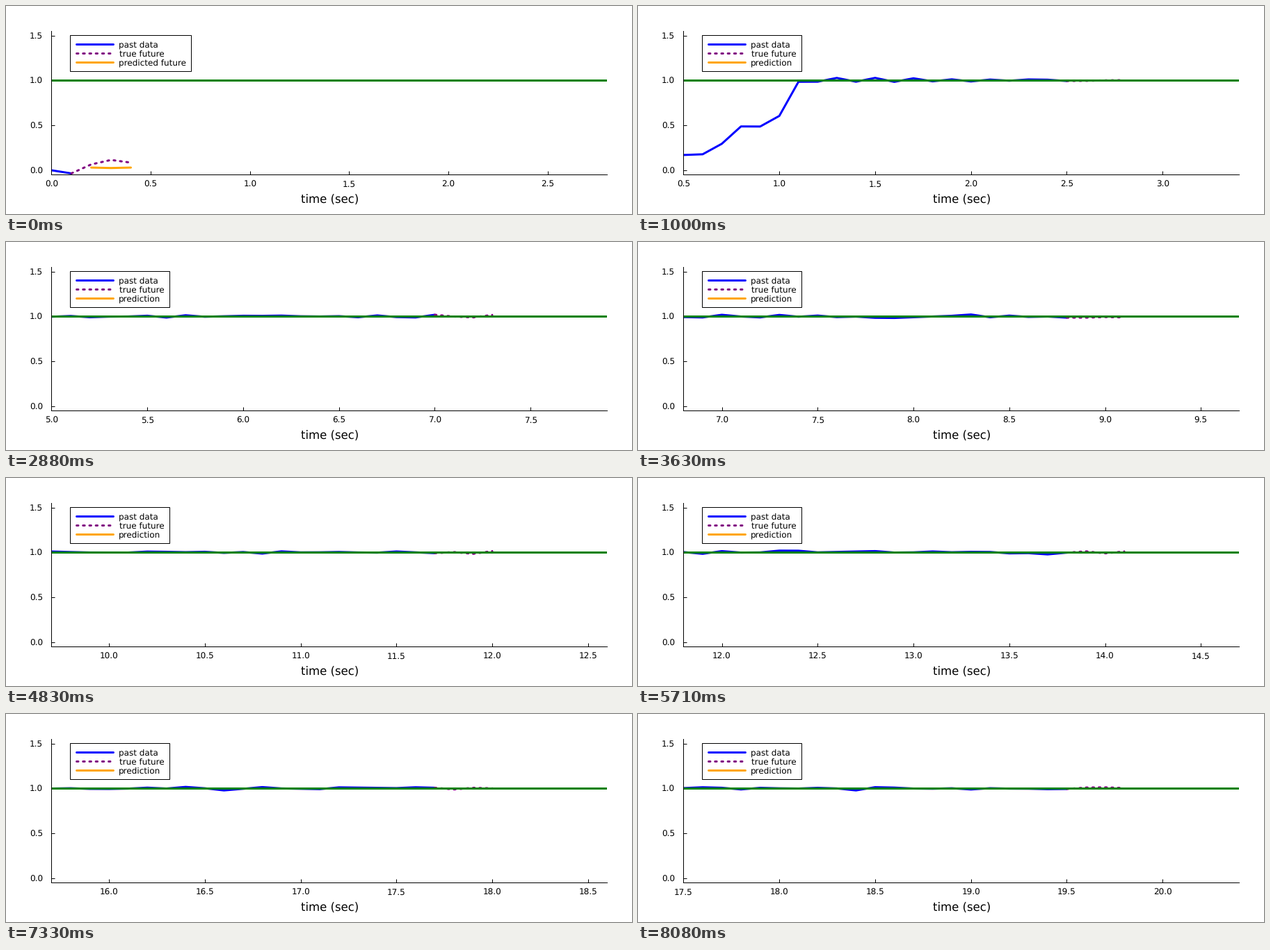
Recreate the animation shown at these times as a matplotlib script. Size 900 px wide and 300 px high, loop 8.12 s.

```python
import numpy as np
import matplotlib.pyplot as plt
from matplotlib.animation import FuncAnimation
from matplotlib.patches import Rectangle
from matplotlib.ticker import FormatStrFormatter, MultipleLocator

W, H, DPI = 900, 300, 100
PX = 72 / DPI                 # points per pixel
FRAMES, LOOP = 195, 8120
DT, HORIZON, START = 0.1, 3, 9  # control takes over at step START
LEFT, RIGHT, TOP, BOTTOM = 65.4, 864.4, 36.1, 243.4

plt.rcParams.update({
    "font.family": "DejaVu Sans",
    "text.hinting": "none",
    "lines.solid_capstyle": "round",
    "lines.dash_capstyle": "round",
    "lines.solid_joinstyle": "round",
    "lines.dash_joinstyle": "round",
})


def make_signal(n):
    """Exploration, then a damped ringing around 1 that fades into noise."""
    rng = np.random.default_rng(4)
    rise = [0, -0.035, 0.065, 0.115, 0.085, 0.17,
            0.178, 0.295, 0.488, 0.487, 0.605, 0.985]
    i = np.arange(n) - len(rise)
    ring = (0.008 - 0.022 * (-1.0) ** i) * np.exp(-np.maximum(i, 0) / 12)
    noise = rng.normal(0, 0.009, n).clip(-0.022, 0.025)
    y = 1 + ring + noise * np.clip(i / 12, 0, 1)
    y[:len(rise)] = rise
    return y


y = make_signal(FRAMES + 1 + HORIZON)
t = np.arange(len(y)) * DT
FIRST_GUESS = np.array([0.03, 0.025, 0.03])

PAST = dict(color="blue", lw=3 * PX)
FUTURE = dict(color="purple", lw=3 * PX, ls=(0, (2.5 / 3, 6.7 / 3)))
GUESS = dict(color="orange", lw=3 * PX)

fig = plt.figure(figsize=(W / DPI, H / DPI), dpi=DPI, facecolor="white")
ax = fig.add_axes([LEFT / W, 1 - BOTTOM / H,
                   (RIGHT - LEFT) / W, (BOTTOM - TOP) / H])
ax.set_ylim(-0.05, 1.55)
for side in ("top", "right"):
    ax.spines[side].set_visible(False)
for side in ("left", "bottom"):
    ax.spines[side].set_linewidth(PX)
ax.tick_params(direction="in", length=5 * PX, width=PX, labelsize=12 * PX)
ax.tick_params(axis="x", pad=8.7 * PX)
ax.tick_params(axis="y", pad=12.2 * PX)
for axis in (ax.xaxis, ax.yaxis):
    axis.set_major_locator(MultipleLocator(0.5))
    axis.set_major_formatter(FormatStrFormatter("%.1f"))
fig.text(465.4 / W, 1 - 284.6 / H, "time (sec)", size=16.5 * PX,
         ha="center", va="baseline")

past, = ax.plot([], [], **PAST)
future, = ax.plot([], [], **FUTURE)
guess, = ax.plot([], [], **GUESS)
ax.axhline(1, color="green", lw=3 * PX)

# legend, laid out in pixels
key = fig.add_axes([0, 0, 1, 1])
key.set(xlim=(0, W), ylim=(H, 0))
key.axis("off")
box = key.add_patch(Rectangle((92, 42), 174, 52, fc="white", ec="black",
                              lw=PX))


def key_row(row, x, text, style):
    mid = 55 + 12.8 * row
    key.plot([101, 154], [mid, mid], **style)
    return key.text(x, mid + 4.7, text, size=12 * PX, va="baseline")


key_row(0, 162, "past data", PAST)
key_row(1, 163, "true future", FUTURE)
guess_label = key_row(2, 162, "predicted future", GUESS)


def draw(k):
    now = k + 1
    ahead = slice(now + 1, now + HORIZON + 1)
    exploring = k < START

    past.set_data(t[:now + 1], y[:now + 1])
    future.set_data(t[now:now + HORIZON + 1], y[now:now + HORIZON + 1])
    if exploring:
        level = FIRST_GUESS + k / START * (y[ahead] - FIRST_GUESS)
    else:
        level = np.ones(HORIZON)
    guess.set_data(t[ahead], level)

    guess_label.set_text("predicted future" if exploring else "prediction")
    box.set_width(174 if exploring else 143)
    ax.set_xlim(max(0, round((now - 20) * DT, 1)),
                max(2.8, round((now + 9) * DT, 1)))
    return past, future, guess, guess_label, box


anim = FuncAnimation(fig, draw, frames=FRAMES, interval=LOOP / FRAMES,
                     repeat=True, repeat_delay=0, blit=False)
plt.show()
```
